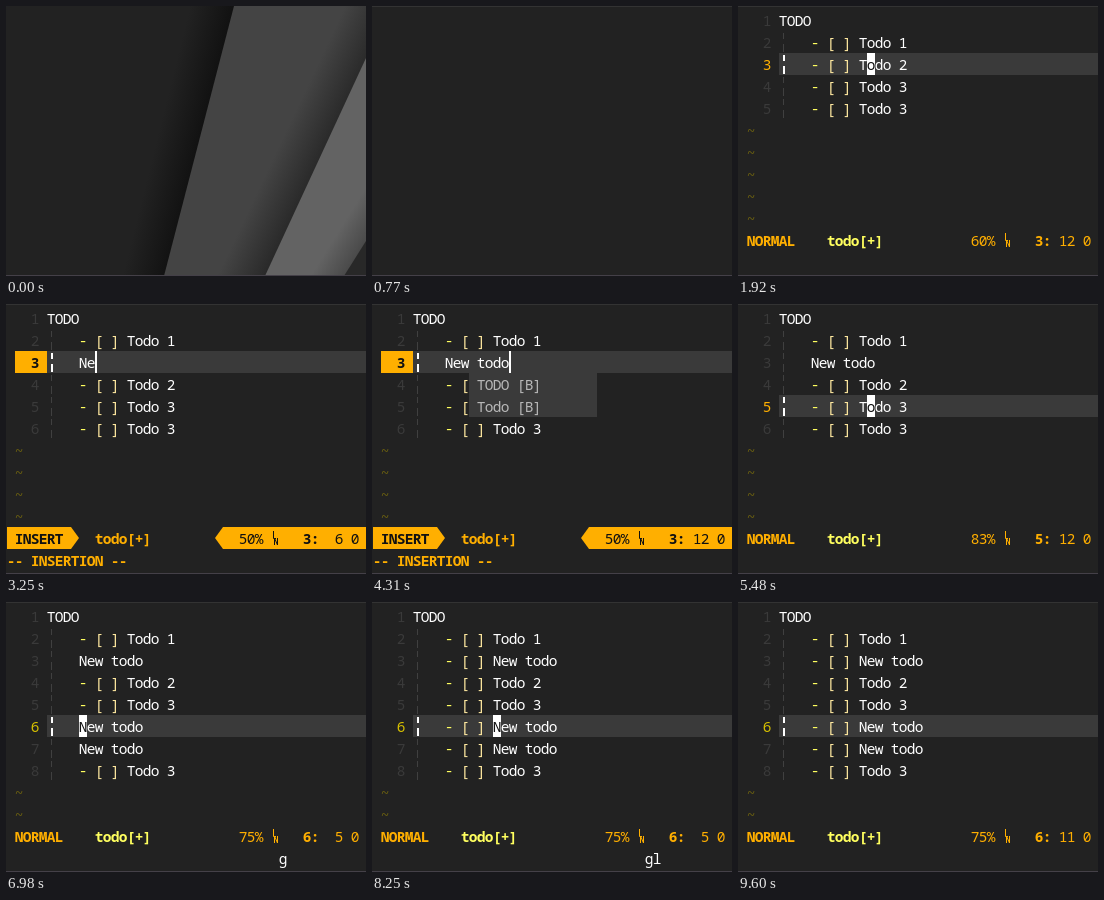
Write an HTML page with a canvas that moves like this. It is 360 px wide and 270 px high and loops after 9.78 s.

```html
<!DOCTYPE html>
<html>
<head>
<meta charset="utf-8">
<style>
html, body { margin: 0; height: 100%; overflow: hidden; background: #222; }
canvas { display: block; }
</style>
</head>
<body>
<canvas id="stage" width="360" height="270"></canvas>
<script>
const ctx = document.getElementById('stage').getContext('2d');
const LOOP = 9780, BG = '#222222', LIT = '#3a3a3a', ORANGE = '#ffaf00', YELLOW = '#ffff5f';
const CW = 8, LH = 22;
const colX = col => 1 + col * CW;
const rowY = row => 3 + (row - 1) * LH;

function rect(x, y, w, h, color) {
  ctx.fillStyle = color;
  ctx.fillRect(x, y, w, h);
}

function poly(points, fill) {
  ctx.fillStyle = fill;
  ctx.beginPath();
  points.forEach(p => ctx.lineTo(...p));
  ctx.fill();
}

// Terminal text: every character is centred in its cell.
function text(str, col, row, color, bold) {
  ctx.font = (bold ? 'bold ' : '') + '14.5px "Noto Sans Mono", monospace';
  ctx.textAlign = 'center';
  ctx.fillStyle = color;
  [...str].forEach((ch, i) => ctx.fillText(ch, colX(col + i) + CW / 2, rowY(row) + 17));
}

// Buffer lines; a leading * marks a checkbox item.
const plain = ['Todo 1', 'Todo 2', 'Todo 3', 'Todo 3'];
const boxed = plain.map(s => '*' + s);
const withNew = s => [boxed[0], s, ...boxed.slice(1)];
const pasted = ['Todo 1', 'New todo', 'Todo 2', 'Todo 3', 'New todo', 'New todo', 'Todo 3'];
const mixed = pasted.map(s => s[0] === 'N' ? s : '*' + s);

const type = (s, popup, lag = 0) =>
  ({ items: withNew(s), col: s.length + 5, pos: s.length + 5 - lag, popup });

// Each step changes only the listed parts of the editor state.
const steps = [
  [810, { items: plain, line: 3, col: 6, pos: 6, cmd: '', blink: true, numColor: ORANGE }],
  [1590, { cmd: 'g' }],
  [1750, { cmd: 'gl' }],
  [1880, { items: boxed, col: 12 }],
  [1920, { pos: 12, cmd: '' }],
  [2390, { ...type(''), insert: true, numBox: true }],
  [3030, type('N', false, 1)],
  [3070, type('N')],
  [3250, type('Ne', false, 1)],
  [3290, type('Ne')],
  [3470, type('New', false, 1)],
  [3510, type('New')],
  [3650, type('New ')],
  [3820, type('New t', false, 1)],
  [3860, type('New t', true, 1)],
  [3980, type('New to', false, 1)],
  [4020, type('New to', true, 1)],
  [4140, type('New tod', false, 1)],
  [4180, type('New tod', true, 1)],
  [4310, type('New todo', true, 1)],
  [4600, { popup: false, insert: false, col: 12, pos: 12, cmd: '^[' }],
  [4640, { cmd: '' }],
  [4980, { numBox: false, cmd: 'y' }],
  [5130, { cmd: '' }],
  [5300, { line: 4, cmd: 'j' }],
  [5340, { cmd: '' }],
  [5480, { line: 5 }],
  [5910, { cmd: '2' }],
  [6290, { items: mixed, line: 6, col: 5, pos: 5, numColor: '#d7c000' }],
  [6330, { cmd: '' }],
  [6980, { cmd: 'g' }],
  [7190, { cmd: 'gl' }],
  [7340, { items: pasted }],
  [7380, { cmd: '' }],
  [7830, { cmd: 'g' }],
  [8040, { cmd: 'gl' }],
  [8250, { items: pasted.map(s => '*' + s), col: 11 }],
  [8290, { pos: 11, cmd: '' }],
  [8960, { blink: false }],
  [9210, { blink: true }],
  [9600, { blink: false }]
];

function shade(x0, y0, x1, y1, dark, base) {
  const g = ctx.createLinearGradient(x0, y0, x1, y1);
  g.addColorStop(0, dark);
  g.addColorStop(1, base);
  return g;
}

function wallpaper() {
  rect(0, 0, 360, 270, shade(193, 135, 153, 125, '#121212', BG));
  poly([[228, 0], [360, 0], [360, 270], [158, 270]], shade(310, 160, 272, 142, '#2a2a2a', '#444444'));
  poly([[360, 52], [360, 270], [259, 270]], shade(349, 252, 325, 237, '#4a4a4a', '#636363'));
  poly([[360, 235], [360, 270], [338, 270]], '#282828');
}

function statusBar(s) {
  const ink = s.insert ? '#111' : ORANGE;
  if (s.insert) {
    const y = rowY(11);
    poly([[1, y], [65, y], [73, y + 11], [65, y + LH], [1, y + LH]], ORANGE);
    poly([[360, y], [217, y], [209, y + 11], [217, y + LH], [360, y + LH]], ORANGE);
    text('-- INSERTION --', 0, 12, ORANGE, true);
  }
  text(s.insert ? 'INSERT' : 'NORMAL', 1, 11, ink, true);
  text('todo[+]', 11, 11, s.insert ? ORANGE : YELLOW, true);
  const total = s.items.length + 1;
  text(Math.floor(s.line / total * 100) + '%', 29, 11, ink);
  // Small stacked "LN" line symbol
  ctx.strokeStyle = ink;
  ctx.lineWidth = 1;
  ctx.beginPath();
  [[[267.5, 227], [267.5, 234.5], [270, 234.5]],
   [[268.5, 241], [268.5, 234], [271.5, 241], [271.5, 234]]]
    .forEach(line => line.forEach((p, i) => i ? ctx.lineTo(...p) : ctx.moveTo(...p)));
  ctx.stroke();
  text(s.line + ':', 37, 11, ink, true);
  text(String(s.pos).padStart(2), 40, 11, ink);
  text('0', 43, 11, ink);
  text(s.cmd, 34, 12, '#fff');
}

function editor(s) {
  const lineY = rowY(s.line);
  rect(41, lineY, 319, LH, LIT);
  if (s.numBox) rect(9, lineY, 32, LH, ORANGE);

  ['TODO', ...s.items].forEach((item, i) => {
    const row = i + 1, current = row === s.line;
    text(String(row), 3, row, current ? (s.numBox ? '#111' : s.numColor) : LIT, current && s.numBox);
    if (!i) return text(item, 5, row, '#fff');
    const guide = current ? '#fff' : '#404040';
    const width = current ? 2 : 1;
    rect(45, rowY(row) + 2, width, 6, guide);
    rect(45, rowY(row) + 13, width, 8, guide);
    const checked = item[0] === '*';
    if (checked) {
      text('-', 9, row, YELLOW);
      text('[ ]', 11, row, '#ffe9a0');
    }
    const label = checked ? item.slice(1) : item;
    const start = checked ? 15 : 9;
    text(label, start, row, '#fff');
    if (current && !s.insert && s.blink) {
      const col = s.col + 4;
      rect(colX(col), lineY, CW, LH, '#fff');
      text(label[col - start] || '', col, row, '#111');
    }
  });
  for (let row = s.items.length + 2; row <= 10; row++) text('~', 1, row, '#6b6010');

  if (s.insert) rect(colX(s.col + 4), lineY, 2, LH, '#fff');
  if (s.popup) {
    rect(97, rowY(4), 128, 2 * LH, LIT);
    text('TODO [B]', 13, 4, '#b8b8b8');
    text('Todo [B]', 13, 5, '#b8b8b8');
  }
  statusBar(s);
}

function draw(now) {
  const t = now % LOOP;
  if (t < 770) wallpaper();
  else {
    rect(0, 0, 360, 270, BG);
    rect(0, 0, 360, 1, '#333');
    if (t >= 810) editor(Object.assign({}, ...steps.filter(([at]) => at <= t).map(([, part]) => part)));
  }
  rect(0, 269, 360, 1, '#444048');
  requestAnimationFrame(draw);
}
requestAnimationFrame(draw);
</script>
</body>
</html>
```
